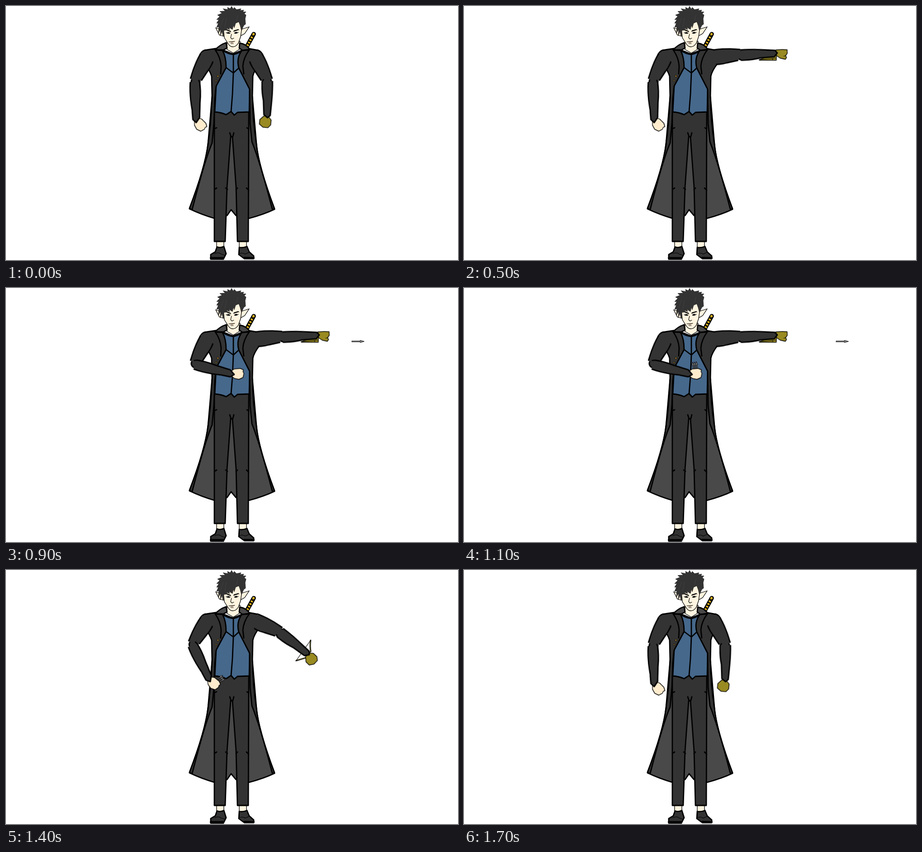
An HTML page that plays this animation: 998 px wide and 561 px high, repeating every 1.8 s.

```html
<!DOCTYPE html>
<html lang="en">
<head>
<meta charset="utf-8">
<title>Wrist crossbow</title>
<style>
html, body { margin: 0; width: 100%; height: 100%; overflow: hidden; background: #fff; }
svg { display: block; width: 998px; height: 561px; }
path, circle { stroke-linejoin: round; stroke-linecap: round; }
.coat { fill: #333; stroke: #000; stroke-width: 2.8; }
.lining { fill: #494949; stroke: #000; stroke-width: 2.8; }
.shirt { fill: #46688b; stroke: #000; stroke-width: 2.8; }
.line { fill: none; stroke: #000; stroke-width: 2.8; }
.thin { fill: none; stroke: #000; stroke-width: 1.1; }
.skin { fill: #fff4df; stroke: #000; stroke-width: 1.3; }
.palm { fill: #ffeccd; stroke: #000; stroke-width: 1.4; }
.glove { fill: #998a22; stroke: #000; stroke-width: 1.4; }
.steel { fill: #888; stroke: #000; stroke-width: .9; }
.brass { fill: #a8822c; stroke: #000; stroke-width: .8; }

/* Every move advances in 100 ms poses. */
.anim { animation: 1.8s step-end infinite; }
#body { animation-name: sway; }
#upR { animation-name: upR; }
#foreR { animation-name: foreR; }
#upL { animation-name: upL; }
#foreL { animation-name: foreL; }
#handL { animation-name: handL; }
#bolts { animation-name: bolts; }
#bow { animation-name: bow; }
#fist { animation-name: front; }
#aim { animation-name: side; }
#shot { animation-name: fly, seen; }

@keyframes sway {
  0%, 77.77% { transform: none; }
  72.22% { transform: translateX(.8px); }
}
@keyframes upR {
  0% { transform: rotate(66deg); animation-timing-function: steps(3); }
  16.66% { transform: rotate(38deg); animation-timing-function: steps(2); }
  27.77% { transform: rotate(-3deg); }
  72.22% { transform: rotate(-3deg); animation-timing-function: steps(2); }
  83.33% { transform: rotate(57deg); animation-timing-function: steps(2); }
  94.44%, 100% { transform: rotate(66deg); }
}
@keyframes foreR {
  0% { transform: rotate(24deg); animation-timing-function: steps(3); }
  16.66% { transform: rotate(19deg); animation-timing-function: steps(2); }
  27.77% { transform: rotate(0deg); }
  72.22% { transform: rotate(0deg); animation-timing-function: steps(2); }
  83.33% { transform: rotate(21deg); animation-timing-function: steps(2); }
  94.44%, 100% { transform: rotate(24deg); }
}
@keyframes upL {
  0%, 66.66% { transform: rotate(66deg); }
  72.22% { transform: rotate(56deg); animation-timing-function: steps(2); }
  83.33%, 100% { transform: rotate(66deg); }
}
@keyframes foreL {
  0% { transform: rotate(26deg); }
  27.77% { transform: rotate(26deg); animation-timing-function: steps(4); }
  50% { transform: rotate(100deg); }
  61.11% { transform: rotate(100deg); animation-timing-function: steps(2); }
  72.22% { transform: rotate(84deg); animation-timing-function: steps(2); }
  83.33%, 100% { transform: rotate(26deg); }
}
@keyframes handL {
  0% { transform: rotate(38deg); }
  27.77% { transform: rotate(38deg); animation-timing-function: steps(4); }
  50% { transform: rotate(14deg); }
  61.11% { transform: rotate(14deg); animation-timing-function: steps(2); }
  72.22% { transform: rotate(4deg); animation-timing-function: steps(2); }
  83.33%, 100% { transform: rotate(38deg); }
}
@keyframes bolts {
  0%, 88.88%, 100% { opacity: 0; transform: rotate(98deg); }
  61.11% { opacity: 1; transform: rotate(98deg); }
  72.22% { opacity: 1; transform: rotate(98deg); animation-timing-function: steps(2); }
  83.33% { opacity: 1; transform: rotate(55deg); }
}
@keyframes bow {
  0%, 27.77%, 88.88% { opacity: 0; }
  11.11%, 72.22% { opacity: 1; }
}
@keyframes front {
  0%, 72.22% { opacity: 1; }
  27.77% { opacity: 0; }
}
@keyframes side {
  0%, 72.22% { opacity: 0; }
  27.77% { opacity: 1; }
}
@keyframes fly {
  0% { transform: translateX(-58px); }
  38.88% { transform: translateX(-58px); animation-timing-function: steps(6); }
  72.22%, 100% { transform: translateX(116px); }
}
@keyframes seen {
  0%, 72.22% { opacity: 0; }
  38.88% { opacity: 1; }
}
</style>
</head>
<body>
<svg viewBox="0 0 998 561">
  <defs>
    <g id="upper">
      <circle class="coat" cx="60" r="9.5"/>
      <path fill="#333" d="M-4-14L0-15Q24-18 58-13L62 0L52 11L28 15L5 17Z"/>
      <path class="line" d="M0-15Q24-18 58-13M5 17Q15 18 28 15L52 11"/>
    </g>
    <path id="bolt" class="steel" d="M5-1H19V-2.5L26 0L19 2.5V1H5Z"/>
  </defs>

  <g id="body" class="anim">
    <path d="M531 91L547 62" fill="none" stroke="#000" stroke-width="9.5"/>
    <path d="M533 88L545 65" fill="none" stroke="#e3b71d" stroke-width="5" stroke-dasharray="3.4 3" style="stroke-linecap:butt"/>
    <circle cx="546.5" cy="62" r="2.6" fill="#e3b71d"/>

    <path class="lining" d="M455 200L446 305C442 340 425 395 405 448Q430 460 460 469L488 463L497 450L508 463L537 469Q570 460 593 449C573 395 556 340 553 305L544 200Z"/>
    <path class="skin" d="M465 518H481V534H465ZM515 518H531V534H515Z"/>
    <path class="coat" d="M466 532Q474 535 481 531L486 547L480 559H452V549L462 543Z"/>
    <path class="coat" d="M515 533Q523 535 532 531L537 543L547 552V558H526L514 549Z"/>
    <path d="M452 556.500H480M526 556L547 556.500" fill="none" stroke="#000" stroke-width="4"/>
    <path class="thin" d="M461 547Q471 543 475 548L482 550M516 547Q523 544 528 548L537 544"/>
    <path class="coat" d="M460 233L460 520H484L488 400L496 289H500L508 400L511 520H535L536 233Z"/>
    <path class="line" d="M494 280L497 289L501 288L503 280M460 271L465 269M532 269L536 272M462 404L465 402M485 402L489 405M508 405L511 402M531 402L536 407"/>

    <path class="shirt" d="M476 96L464 177L461 234Q475 235 486 240L497 233L504 241L511 235L537 234L538 184L523 97L501 106Z"/>
    <path class="line" d="M478 98Q490 106 502 107Q514 105 523 97M486 136L502 148L515 136M502 107V148L500 195L497 233"/>

    <path class="coat" d="M470 93L443 97A15 15 0 0 0 428 112L438 127Q450 142 454 155L455 200Q453 255 446 305C442 340 425 395 405 447L411 450C430 375 443 330 455 303L459 260L461 205L464 177L486 136Q486 112 478 98Z"/>
    <path class="coat" d="M530 93L552 97A15 15 0 0 1 567 112L560 127Q548 142 545 155L544 200Q545 255 553 305C556 340 573 395 593 448L588 449C569 375 555 330 543 300L539 260L538 184L514 137Q508 115 521 98Z"/>
    <path class="line" d="M462 97Q474 114 475 133L474 150M537 97Q524 115 523 133L525 150"/>
    <circle class="brass" cx="468" cy="155" r="2.1"/>
    <circle class="brass" cx="464" cy="164.500" r="1.6"/>

    <path class="skin" d="M488 78V96L502 104L515 96L517 78Z"/>
    <path class="lining" d="M462 97Q471 86 486 81L488 93L478 98ZM516 82Q531 84 538 96L522 98L515 93Z"/>
    <path class="line" d="M462 97H478M521 98L537 97"/>

    <path class="skin" d="M481 54L463 48L471 64L481 67ZM518 52L537 46L527 61L518 66Z"/>
    <path class="skin" d="M479 38L482 70L491 84Q495 90 500 90Q507 91 513 82L518 68L521 46L516 30H488Z"/>
    <path d="M485 53L497 58L496 55L487 51ZM502 57L514 53L516 54L513 51L503 54Z"/>
    <path d="M485 59Q490 55 496 60Q490 63 485 59ZM503 60Q508 55 514 58Q509 63 503 60Z"/>
    <path d="M487 59L489 58.500M510 58L512 58" stroke="#fff" stroke-width="1"/>
    <path class="thin" d="M498 62L496 70L499 73L503 71M496 83H502"/>
    <path d="M493 79L498 77L505 78L499 82Z" fill="#d8bda6"/>
    <path class="thin" d="M492 79L499 79.500L505 78"/>
    <path fill="#333" stroke="#222" stroke-width=".8" d="M520 54L525 43L529 40L528 28L530 20L526 17L530 13L523 13L525 9L517 10L519 6L509 8L504 3L502 7L498 1L495 6L489 3L490 8L479 6L484 11L472 12L477 16L467 20L472 23L465 30L470 30L465 38L469 38L465 47L470 46L469 60L474 51L473 66L477 56L479 67L481 54L489 53L486 49L494 52L492 47L500 52L502 42L504 48L507 38L514 35L517 43Z"/>
    <path d="M474 45L480 27M483 46L487 27M509 32L512 20" fill="none" stroke="#444" stroke-width=".8"/>
  </g>

  <g transform="translate(443 112) scale(-1 1)">
    <g id="upL" class="anim">
      <use href="#upper"/>
      <g transform="translate(62 0)"><g id="foreL" class="anim">
        <g transform="translate(83 0)"><g id="handL" class="anim">
          <g transform="translate(14 0)"><g id="bolts" class="anim">
            <use href="#bolt" y="-4"/><use href="#bolt"/><use href="#bolt" y="4"/>
          </g></g>
          <path class="palm" d="M0 6L6 10L19 11L26 8L25 4L27 0L25-9L16-13L6-11L0-6Z"/>
        </g></g>
        <path fill="#333" d="M-4 8L2 10Q24 12 45 9L78 7L89-1L82-8L60-9Q25-14 0-11Z"/>
        <path class="line" d="M-4 8L2 10Q24 12 45 9L78 7L89-1L82-8L60-9Q25-14 0-11"/>
      </g></g>
    </g>
  </g>

  <g id="shot" class="anim">
    <path class="steel" d="M763.500 117H782V115.500L791 118L782 120.500V119H763.500Z"/>
  </g>

  <g transform="translate(552 112)">
    <g id="upR" class="anim">
      <use href="#upper"/>
      <g transform="translate(60 0)"><g id="foreR" class="anim">
        <g id="bow" class="anim">
          <path d="M63-28Q70-16 78-9V9Q73 16 65 27" fill="none" stroke="#000" stroke-width="2.8"/>
          <path d="M64-26Q70-16 78-9V9Q73 16 66 25" fill="none" stroke="#998a22" stroke-width=".8"/>
          <path class="thin" d="M63-28L65 27"/>
        </g>
        <path id="fist" class="anim glove" d="M77-3L85-9L96-8L102-2L101 9L94 17L84 16L76 7Z"/>
        <g id="aim" class="anim">
          <path class="glove" d="M39 12L60 5L78 3L77 15L40 13Z"/>
          <path class="thin" d="M40 12L77 10M69 10V14"/>
          <path class="glove" d="M77-8L91-8L102-7V1L98 6L100 10L97 14L86 11L78 5Z"/>
          <path class="thin" d="M94 7L98 6"/>
        </g>
        <path fill="#333" d="M-4 8L0 11Q20 12 42 8L73 7L80-1L75-7L55-9Q20-13 0-12Z"/>
        <path class="line" d="M-4 8L0 11Q20 12 42 8L73 7L80-1L75-7L55-9Q20-13 0-12"/>
      </g></g>
    </g>
  </g>
</svg>
</body>
</html>
```
